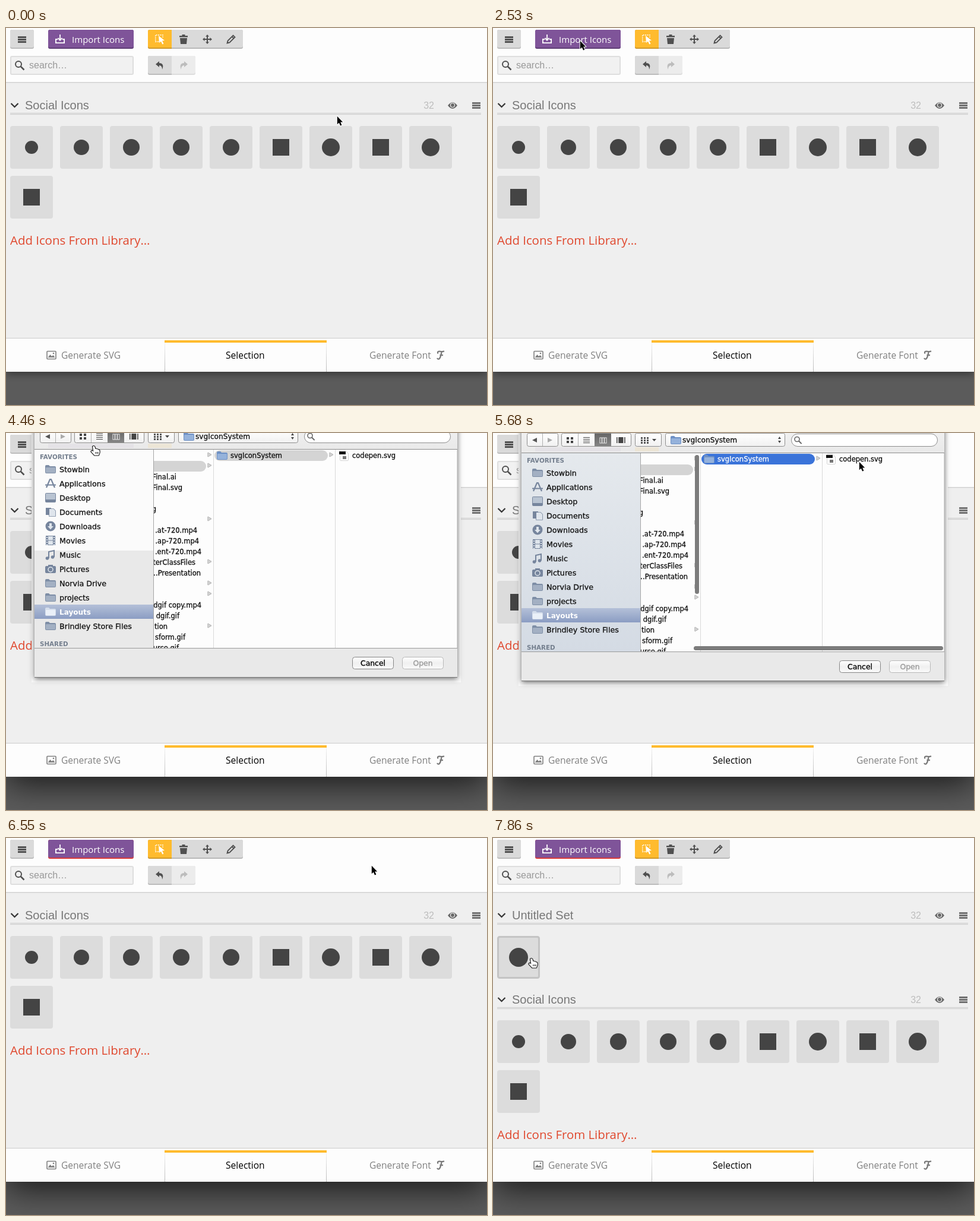
Animation, 810 px wide and 635 px high, one loop 8000 ms. Source, as an HTML page with a canvas:

```html
<!DOCTYPE html>
<html lang="en">
<head>
<meta charset="utf-8">
<title>Icon import</title>
<style>
  html, body { margin: 0; width: 100%; height: 100%; overflow: hidden; background: #5a5a5a; }
  canvas { display: block; }
</style>
</head>
<body>
<canvas id="stage" width="810" height="635"></canvas>
<script>
const ctx = document.getElementById('stage').getContext('2d');
const LOOP = 8000;
const UI = '"Open Sans", sans-serif';
const HELV = '"Liberation Sans", sans-serif';
const MAC = '"DejaVu Sans", sans-serif';

// Held steps: time, x, y, pointer kind
const POINTER = [
  [0, 557, 148], [900, 546, 153], [1050, 505, 186], [1200, 420, 178], [1340, 330, 148],
  [1490, 250, 113], [1640, 221, 105], [1940, 216, 99], [2090, 195, 74], [2230, 169, 46],
  [2380, 151, 26], [2530, 146, 21], [4020, 148, 22, 'hand'], [4750, 205, 34],
  [4890, 370, 56], [5090, 545, 58], [5230, 616, 48], [5820, 615, 46],
  [7260, 560, 66], [7410, 380, 130], [7560, 180, 190], [7710, 80, 208], [7860, 65, 203, 'hand']
];
// Sheet steps: time, vertical offset, column scroll
const SHEET = [
  [0, null], [4310, -190, 0], [4460, -6, 0], [4600, 0, 0], [5820, 0, 0], [5970, 0, 110],
  [6110, 0, 208], [6260, -10, 208], [6410, -230, 208], [6550, null]
];
const SIDEBAR = ['Stowbin', 'Applications', 'Desktop', 'Documents', 'Downloads', 'Movies', 'Music',
  'Pictures', 'Norvia Drive', 'projects', 'Layouts', 'Brindley Store Files'];
// Cut-off file names: row, text, right edge
const FILES = [[2, 'Final.ai', 287], [3, 'Final.svg', 297], [5, 'g', 253], [7, '.at-720.mp4', 322],
  [8, '.ap-720.mp4', 325], [9, '.ent-720.mp4', 329], [10, 'terClassFiles', 319],
  [11, '…Presentation', 328], [14, 'dgif copy.mp4', 329], [15, 'dgif.gif', 292],
  [16, 'tion', 272], [17, 'sform.gif', 302], [18, 'urce.gif', 291]];
const FOLDER_ROWS = [0, 1, 6, 10, 12, 13, 16];
const INFO = [['Name', 'codepen.svg'], ['Kind', 'SVG Image'], ['Size', '2 KB'],
  ['Created', 'Today, 8:24 AM'], ['Modified', 'Today, 8:24 AM'],
  ['Last opened', 'Today, 8:24 AM'], ['Dimensions', '--']];
// Tile marks: positive is a circle radius, negative half a square side
const MARKS = [11, 13, 14, 14, 14, -14, 15, -14, 15, -14];

const held = (steps, t) => steps.filter(s => s[0] <= t).pop();

function rect(x, y, w, h, color) {
  ctx.fillStyle = color;
  ctx.fillRect(x, y, w, h);
}
function paint(fill, stroke, line) {
  if (fill) { ctx.fillStyle = fill; ctx.fill(); }
  if (stroke) { ctx.strokeStyle = stroke; ctx.lineWidth = line; ctx.stroke(); }
}
function round(x, y, w, h, r, fill, stroke, line = 1) {
  ctx.beginPath();
  ctx.roundRect(x, y, w, h, r);
  paint(fill, stroke, line);
}
function disc(x, y, r, fill, stroke, line = 1) {
  ctx.beginPath();
  ctx.arc(x, y, r, 0, Math.PI * 2);
  paint(fill, stroke, line);
}
function path(d, x, y, fill, stroke, line = 1) {
  const p = new Path2D(d);
  ctx.save();
  ctx.translate(x, y);
  if (stroke) { ctx.strokeStyle = stroke; ctx.lineWidth = line; ctx.stroke(p); }
  if (fill) { ctx.fillStyle = fill; ctx.fill(p); }
  ctx.restore();
}
function text(s, x, y, font, color, align = 'left') {
  ctx.font = font;
  ctx.fillStyle = color;
  ctx.textAlign = align;
  ctx.fillText(s, x, y);
}
// Sheet text is slightly heavier than regular
function label(s, x, y, size, color, align) {
  text(s, x, y, `${size}px ${MAC}`, color, align);
  ctx.strokeStyle = color;
  ctx.lineWidth = 0.3;
  ctx.strokeText(s, x, y);
}
function fade(y0, y1, ...colors) {
  const g = ctx.createLinearGradient(0, y0, 0, y1);
  colors.forEach((c, i) => g.addColorStop(i / (colors.length - 1), c));
  return g;
}
function clipped(x, y, w, h, draw) {
  ctx.save();
  ctx.beginPath();
  ctx.rect(x, y, w, h);
  ctx.clip();
  draw();
  ctx.restore();
}
function bars(x, y, color) {
  for (let i = 0; i < 3; i++) rect(x, y + i * 4, 14, 3, color);
}
function lens(x, y, r, color, line) {
  disc(x, y, r, null, color, line);
  const k = r * 0.75;
  path(`M${k} ${k}L${r * 1.9} ${r * 1.9}`, x, y, null, color, line * 1.25);
}
function keyCap(x, y, w, fill, edge, corners = 3) {
  round(x, y, w, 32, corners, edge);
  round(x, y, w, 30, corners, fill);
}

function header(primed) {
  rect(0, 0, 810, 91, '#fdfdfd');
  rect(0, 91, 810, 1, '#cfcfcf');
  rect(0, 92, 810, 1, '#e3e3e3');
  keyCap(7, 3, 40, '#dadada', '#bcbcbc');
  bars(20, 14, '#505050');

  keyCap(71, 3, 144, '#7f5499', primed ? '#d93a3a' : '#5f3d76');
  path('M4 8H0.9V14.1H15.1V8H12M8 0V9M4.5 6L8 9.6L11.5 6', 83, 11, null, '#fff', 1.8);
  text('Import Icons', 111, 25, `15px ${UI}`, '#fff');

  keyCap(239, 3, 160, '#dadada', '#b8b8b8');
  keyCap(239, 3, 40, '#ffbb2e', '#d0992a', [3, 0, 0, 3]);
  ctx.setLineDash([2, 1.5]);
  path('M6 12H.7V.7H13V5', 251, 11, null, '#fff', 1.4);
  ctx.setLineDash([]);
  path('M0 0L10 8L6 8.4L8.5 13.4L6.3 14.5L4 9.4L1 12Z', 257, 13, '#fff');
  const ink = '#505050';
  path('M0 2H4.5V0H9.5V2H14V4.5H0ZM1 6H13L12 16H2Z', 292, 11, ink);
  path('M8 1V15M1 8H15', 331, 11, null, ink, 2);
  path('M8 0L11 3.5H5ZM8 16L5 12.5H11ZM0 8L3.5 5V11ZM16 8L12.5 11V5Z', 331, 11, ink);
  path('M1.5 14.5L2.5 10.5L11.5 1.5L14.5 4.5L5.5 13.5ZM9.5 3.5L12.5 6.5', 371, 11, null, ink, 1.8);
  path('M1 15L2 11L5 14Z', 371, 11, ink);

  round(8, 48, 206, 30, 2, '#f1f1f1', '#dedede', 2);
  lens(21, 61, 5, '#505050', 2);
  text('search…', 39, 68, `16px ${HELV}`, '#999');
  keyCap(239, 47, 80, '#ececec', '#dcdcdc');
  keyCap(239, 47, 40, '#dadada', '#bcbcbc', [3, 0, 0, 3]);
  const arrow = 'M0 5L6 0V3C12 3 14 7 11 14C11 9 9 7 6 7V10Z';
  path(arrow, 252, 56, '#505050');
  ctx.save();
  ctx.translate(306, 56);
  ctx.scale(-1, 1);
  path(arrow, 0, 0, '#bdbdbd');
  ctx.restore();
}

function section(title, y) {
  path('M1 1L7 7L13 1', 7.5, y + 126, null, '#333', 2.2);
  text(title, 32, y + 137, `20px ${HELV}`, '#777');
  text('32', 721, y + 136, `16px ${HELV}`, '#bdbdbd', 'right');
  path('M0 5.5Q8 -5 16 5.5Q8 16 0 5.5Z', 744, y + 125, '#686868');
  disc(752, y + 130, 4.1, '#efefef');
  disc(752, y + 130, 2.9, '#686868');
  bars(785, y + 125, '#707070');
  rect(7, y + 143, 793, 1, '#c9c9c9');
  rect(7, y + 145, 793, 1, '#c9c9c9');
}
function tile(x, y, mark, hover) {
  round(x, y, 72, 72, 4, '#dcdcdc');
  if (hover) round(x + 1.5, y + 1.5, 69, 69, 3, null, '#c4c4c4', 3);
  if (mark > 0) disc(x + 36, y + 36, mark, '#444');
  else rect(x + 36 + mark, y + 36 + mark, -2 * mark, -2 * mark, '#444');
}
function library(imported, hover) {
  rect(0, 93, 810, 429, '#efefef');
  if (imported) {
    section('Untitled Set', 0);
    tile(7, 165, 16, hover);
  }
  const y = imported ? 142 : 0;
  section('Social Icons', y);
  MARKS.forEach((m, i) => tile(7 + i % 9 * 84, y + 165 + Math.floor(i / 9) * 84, m));
  text('Add Icons From Library…', 7, y + 365, `20.4px ${UI}`, '#e0482e');
}

function footer(primed) {
  rect(0, 579, 810, 56, '#5b5b5b');
  clipped(0, 579, 810, 56, () => {
    ctx.shadowColor = primed ? 'rgba(0,0,0,.75)' : 'rgba(0,0,0,.5)';
    ctx.shadowBlur = primed ? 54 : 14;
    ctx.shadowOffsetY = primed ? 12 : 2;
    rect(0, 300, 810, 279, '#000');
  });
  rect(0, 522, 810, 57, '#fdfdfd');
  rect(0, 522, 810, 1, '#cccccc');
  const side = fade(530, 579, '#f2f2f2', '#b8b8b8');
  rect(267, 530, 1, 49, side);
  rect(539, 530, 1, 49, side);
  rect(267, 526, 273, 4, '#ffbb2e');
  const font = `15.55px ${UI}`;
  round(69, 544.5, 15, 13, 1, null, '#808080', 1.6);
  path('M0 8L4 3L6.5 6L9 4L12 8Z', 70.5, 547, '#808080');
  disc(80, 548, 1.3, '#808080');
  text('Generate SVG', 93, 557, font, '#808080');
  text('Selection', 370, 557, font, '#000');
  text('Generate Font', 612, 557, font, '#808080');
  path('M3 5Q1 1 6 1Q10 2.5 13.5 .8M9 2Q8 9 6 12.5Q3.5 16 1.5 12.5M6 7.5H11.5', 724.5, 543.5, null, '#777', 2.2);
}

function folder(x, y, light) {
  path('M0 2Q0 0 2 0H6L8 2H16Q18 2 18 4V12Q18 14 16 14H2Q0 14 0 12Z', x, y,
    light ? '#d5deec' : '#7e8ea6');
  round(x + 1, y + 4, 16, 9, 1, light ? '#eaf0f8' : '#a3b0c3');
}
function blueFolder(x, y) {
  ctx.save();
  ctx.filter = 'saturate(2.2)';
  folder(x, y);
  ctx.restore();
}
function fileMark(x, y) {
  path('M2 0H11L15 4V16H2Z', x, y, '#fff', '#aaa');
  rect(x, y + 1, 11, 5, '#111');
  rect(x + 6, y + 9, 6, 5, '#777');
}
function sideIcon(i, y) {
  const c = '#76859d', soft = '#dfe5ec';
  if (i === 1) path('M2 15L8 1H10L16 15M0 10.5H18', 66, y - 8, null, c, 2.2);
  else if (i === 2) {
    round(66.5, y - 7.5, 17, 15, 1, '#b9c4d2', c);
    rect(67, y + 3, 16, 4, c);
  } else if (i === 3) {
    rect(67, y - 7, 9, 12, c);
    path('M0 0H7L10 3V12H0Z', 73, y - 5, soft, c, 1.6);
  } else if (i === 4) {
    disc(75, y, 8.5, c);
    path('M-2 -5H2V0H5L0 5.5L-5 0H-2Z', 75, y, soft);
  } else if (i === 5) {
    rect(67, y - 8, 16, 16, c);
    rect(71, y - 7, 8, 6.5, soft);
    rect(71, y + 0.5, 8, 6.5, soft);
    for (let k = -6; k < 8; k += 4) { rect(68, y + k, 2, 2, soft); rect(80, y + k, 2, 2, soft); }
  } else if (i === 6) {
    path('M5 13V2L14 0V11', 67, y - 7, null, c, 2);
    disc(69.5, y + 6, 2.8, c);
    disc(78.5, y + 4, 2.8, c);
  } else if (i === 7) {
    round(66, y - 5, 18, 12, 2, c);
    rect(71, y - 7, 8, 3, c);
    disc(75, y + 1, 4, c, soft, 1.5);
  } else folder(66, y - 7, i === 10);
}
function pushButton(name, x, ink, blue) {
  const fill = blue ? fade(383, 404, '#b9d8f8', '#5c9ce6', '#8fc6fa') : fade(383, 404, '#fff', '#f0f0f0', '#fafafa');
  round(x + .5, 383.5, 69, 20, 4, fill, blue ? '#4a5f94' : ink === '#000' ? '#868686' : '#b8b8b8');
  label(name, x + 35, 398, 12.4, ink, 'center');
}
function pill(x, y, w, color) { round(x, y, w, 18, 9, color); }

function sheetToolbar() {
  rect(48, -20, 712, 53, fade(-20, 33, '#f4f4f4', '#e9e9e9'));
  rect(71, 24, 144, 7, 'rgba(127,84,153,.05)');
  rect(239, 24, 40, 7, 'rgba(255,187,46,.1)');
  rect(48, 33, 712, 1, '#8c8c8c');
  const face = fade(1, 22, '#fff', '#f1f1f1');
  const box = (x, w) => round(x + .5, .5, w - 1, 22, 3, face, '#8d8d8d');
  box(57, 53);
  rect(83, 1, 1, 21, '#b0b0b0');
  path('M8 0V8L0 4Z', 66, 8, '#555');
  path('M0 0L8 4L0 8Z', 92, 8, '#aaa');
  box(115, 118);
  rect(171, 1, 28, 21, fade(1, 22, '#666', '#858585'));
  rect(143, 1, 1, 21, '#b0b0b0');
  for (let i = 0; i < 4; i++) {
    rect(124 + i % 2 * 7, 7 + (i >> 1) * 6, 4, 4, '#444');
    rect(152, 7 + i * 3, 11, 1, '#444');
  }
  for (let i = 0; i < 3; i++) {
    rect(179.5 + i * 4, 7.5, 4, 10, '#eee');
    rect(180.5 + i * 4, 8.5, 2, 8, '#666');
  }
  for (let i = 0; i < 5; i++) rect(208 + i * 3.3, 7, 1.5, 10, '#444');
  rect(212, 7, 7, 10, '#444');
  box(239, 45);
  for (let i = 0; i < 9; i++) rect(249 + i % 3 * 5, 7 + Math.floor(i / 3) * 4, 3, 3, '#555');
  path('M0 0H7L3.5 4Z', 268, 10, '#444');
  box(290, 202);
  blueFolder(299, 5);
  label('svgIconSystem', 319, 16, 12.2, '#111');
  path('M0 4L2.5 0L5 4ZM0 7H5L2.5 11Z', 480, 6, '#444');
  round(502.5, 1.5, 246, 21, 10.5, '#fff', '#8d8d8d');
  lens(512, 10.5, 4, '#666', 1.6);
}

function columns(t, scroll) {
  const size = 11.5;
  const picked = t >= 5820, focus = t >= 5380;
  const nib = (x, y) => path('M0 0L6 3.5L0 7Z', x, y, '#d0d0d0', '#909090');
  rect(248, 34, 512, 334, '#fdfdfd');
  clipped(249, 34, 511, 334, () => {
    ctx.translate(-scroll, 0);
    pill(200, 53, 137, '#d4d4d4');
    FILES.forEach(([row, name, x]) => label(name, x, 48 + row * 18, size, '#111', 'right'));
    FOLDER_ROWS.forEach(row => nib(340, 39 + row * 18));
    const active = focus && !picked;
    pill(351, 35, 191, active ? '#3a73d9' : '#d4d4d4');
    blueFolder(355, 37);
    label('svgIconSystem', 378, 48, size, active ? '#fff' : '#111');
    nib(545, 39);
    if (picked) pill(556, 35, 191, '#3a73d9');
    fileMark(561, 36);
    label('codepen.svg', 583, 48, size, picked ? '#fff' : '#111');
    [349, 554, 759].forEach(x => rect(x, 34, 1, 334, '#d9d9d9'));
    if (picked) {
      rect(837, 219, 53, 1, '#dfe3ee');
      INFO.forEach(([name, value], i) => {
        label(name, 841, 238 + i * 16, 10.6, '#777', 'right');
        label(value, 849, 238 + i * 16, 10.8, '#111');
      });
    }
  });
  if (focus && !picked) {
    round(340, 37, 7, 234, 3.5, '#7c7c7c');
    round(338, 359, 420, 7, 3.5, '#7c7c7c');
  }
}

function sidebar(settled) {
  if (settled) rect(48, 34, 200, 334, fade(34, 368, '#e5e9ed', '#d4dbe4'));
  else {
    rect(48, 34, 200, 170, '#fbfbfb');
    rect(48, 204, 200, 164, '#e9e9e9');
  }
  rect(248, 34, 1, 334, '#a6a6a6');
  clipped(48, 34, 200, 334, () => {
    const head = `bold 10.3px ${MAC}`;
    text('FAVORITES', 57, 50, head, '#747f8e');
    rect(48, 295, 200, 24, fade(295, 319, '#b4c0d8', '#8b9dc3'));
    SIDEBAR.forEach((name, i) => {
      const y = 67 + i * 24;
      sideIcon(i, y);
      if (i === 10) text(name, 90, y + 5, `bold 12px ${MAC}`, '#fff');
      else label(name, 90, y + 5, 12.7, '#111');
    });
    text('SHARED', 57, 365, head, '#747f8e');
  });
}

function sheet(t, offset, scroll) {
  rect(43, 0, 723, t < 6260 ? 426 + offset : 427, '#fbfbfb');
  ctx.save();
  ctx.translate(0, offset);
  ctx.shadowColor = 'rgba(0,0,0,.6)';
  ctx.shadowBlur = 9;
  ctx.shadowOffsetY = 2;
  rect(48, -60, 712, 478, '#e9e9e9');
  ctx.shadowColor = 'transparent';
  columns(t, scroll);
  sidebar(t >= 4600);
  rect(48, 368, 712, 1, '#9a9a9a');
  sheetToolbar();
  pushButton('Cancel', 583, '#000');
  pushButton('Open', 667, t >= 5820 ? '#000' : '#999', t >= 5820);
  rect(48, 417, 712, 1, '#777');
  ctx.restore();
}

function pointer(x, y, kind) {
  ctx.lineJoin = 'round';
  if (kind === 'hand') {
    path('M-2 .8Q0 -.9 1.3 1L2.4 5Q4 4 5 5.6Q6.5 4.8 7.4 6.4Q9.3 6 9.6 8V11L8 15.5H1L-4.5 9.5Q-4.6 7.5-2.5 8L-.7 9.4Z',
      x, y, '#fff', '#111', 2.2);
    path('M2.8 10V13M5 10V13M7 10V13', x, y, null, '#111', .9);
  } else {
    path('M.8 .8V14.2L3.8 11.4L6 16.5L8.4 15.5L6.2 10.5H10.2Z', x, y, '#000', '#fff', 2);
  }
  ctx.lineJoin = 'miter';
}

function draw(t) {
  const primed = t >= 2970;
  const [, x, y, kind] = held(POINTER, t);
  const [, offset, scroll] = held(SHEET, t);
  library(t >= 6690, t >= 7710);
  header(primed);
  footer(primed);
  if (offset !== null) sheet(t, offset, scroll);
  pointer(x, y, kind);
}

const start = performance.now();
function frame() {
  draw((performance.now() - start) % LOOP);
  requestAnimationFrame(frame);
}
frame();
</script>
</body>
</html>
```
